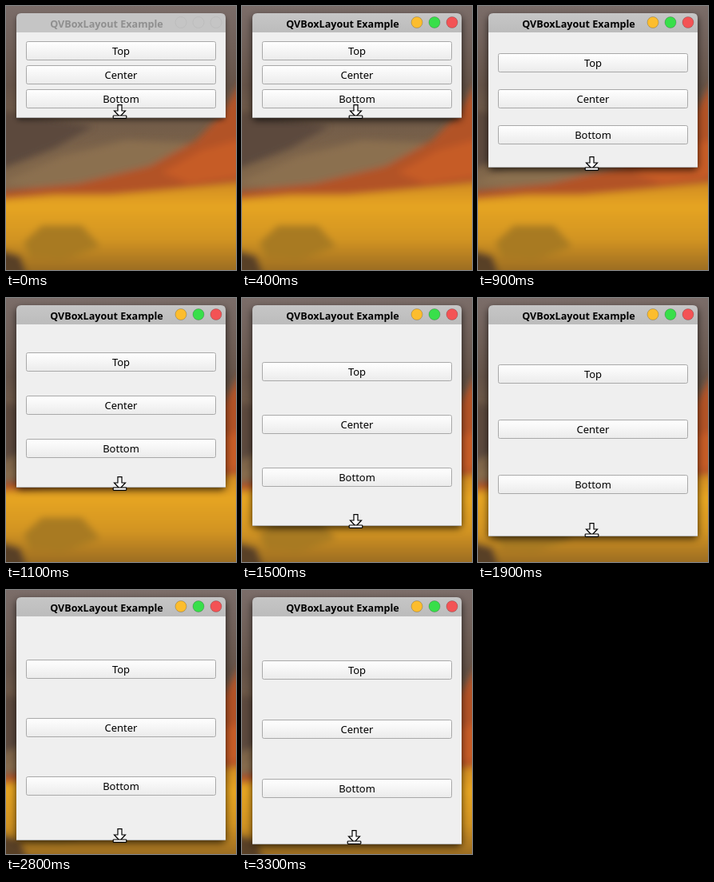
Write an HTML page that moves like this. It is 288 px wide and 330 px high and loops after 5.8 s.

```html
<!DOCTYPE html>
<html lang="en">
<head>
<meta charset="utf-8">
<title>QVBoxLayout Example</title>
<style>
  html, body { margin: 0; width: 100%; height: 100%; overflow: hidden; }
  svg { display: block; width: 288px; height: 330px; }
  text { text-anchor: middle; font: 13px "Noto Sans", sans-serif; }
  #title { font-size: 12.6px; font-weight: bold; }
  #shadow { filter: blur(5px); opacity: .7; }
  #lights circle { stroke: #0003; }
  .button rect { fill: url(#face); stroke: #a9a9a9; }
  .inactive #title { fill: #8f8f8f; }
  .inactive #bar { fill: #c5c5c5; }
  .inactive #shadow { filter: blur(3px); opacity: .45; }
  .inactive #lights circle { fill: #c5c5c5; stroke: #b9b9b9; stroke-width: .7; }
</style>
</head>
<body>
<svg viewBox="0 0 288 330">
  <defs>
    <linearGradient id="face" x2="0" y2="1">
      <stop stop-color="#fff"/><stop offset="1" stop-color="#ebebeb"/>
    </linearGradient>
    <linearGradient id="barFill" x2="0" y2="1">
      <stop stop-color="#c6c6c6"/><stop offset="1" stop-color="#bcbcbc"/>
    </linearGradient>
    <linearGradient id="slope" x2="0" y2="1">
      <stop stop-color="#7b6d69"/><stop offset=".3" stop-color="#655348"/>
      <stop offset=".6" stop-color="#80664a"/>
    </linearGradient>
    <linearGradient id="trees" x2="0" y2="1">
      <stop stop-color="#d08a22"/><stop offset=".25" stop-color="#e6a522"/>
      <stop offset=".6" stop-color="#d29421"/><stop offset="1" stop-color="#8f6425"/>
    </linearGradient>
    <filter id="soft" x="-20%" y="-20%" width="140%" height="140%"><feGaussianBlur stdDeviation="4"/></filter>
  </defs>

  <rect width="288" height="330" fill="url(#slope)"/>
  <g filter="url(#soft)">
    <path d="M-9 150L16 160L30 178L-9 188Z" fill="#7b6d68"/>
    <path d="M-9 205L60 178L110 150L-9 130Z" fill="#5c4a3d"/>
    <path d="M-9 222L70 188L150 168L235 172L200 212L60 230Z" fill="#8b7050"/>
    <path d="M300 85L270 135L238 168L180 200L90 222L-9 232V262H300Z" fill="#b25328"/>
    <path d="M300 165L245 180L195 208L230 222L300 212Z" fill="#c65c28"/>
    <path d="M-9 242L60 236L130 236L200 230L300 220V340H-9Z" fill="url(#trees)"/>
    <path d="M22 295L45 274L95 274L118 300L70 318L30 314Z" fill="#a87a22"/>
    <path d="M-9 304L18 312L28 340H-9Z" fill="#584127"/>
  </g>

  <g id="window">
    <rect id="shadow" x="13" y="13" width="262" rx="5"/>
    <rect id="body" x="13" y="33" width="262" fill="#efefef"/>
    <path id="bar" d="M13 33V15Q13 9 19 9H269Q275 9 275 15V33Z" fill="url(#barFill)"/>
    <text id="title" x="126" y="27">QVBoxLayout Example</text>
    <g id="lights">
      <circle cx="219" cy="20.5" r="7" fill="#fcbd2e"/>
      <circle cx="241" cy="20.5" r="7" fill="#38df4a"/>
      <circle cx="263" cy="20.5" r="7" fill="#f35355"/>
    </g>
    <g id="buttons"></g>
    <path id="edge" d="M13 0H275" stroke="#b4b4b4"/>
  </g>

  <g id="cursor" fill="#fff" stroke="#000" stroke-width="1.2">
    <path d="M-2.5 .6H2.5V8H7L0 15.5L-7 8H-2.5Z"/>
    <rect x="-8.3" y="14" width="16.6" height="3.4" rx=".8"/>
  </g>
</svg>
<script>
const LOOP = 5800, TICK = 100, ACTIVE_AT = 400, RELEASE_AT = 3300;
const TITLE_BOTTOM = 33, MIN_BOTTOM = 140, FIRST_BUTTON = 44, PITCH = 30;

// The drag slows down, then ends with two short tugs: [time, window bottom].
const drag = [
  [500, 140], [700, 167], [1100, 237], [1500, 285], [1700, 294], [1900, 298], [2000, 298],
  [2400, 304], [2700, 304], [2800, 313], [3000, 313], [3100, 318]
];

const $ = id => document.getElementById(id);
const place = (el, x, y) => el.setAttribute("transform", `translate(${x} ${y})`);

$("buttons").innerHTML = ["Top", "Center", "Bottom"].map(label =>
  `<g class="button"><rect x="25.5" y=".5" width="237" height="23" rx="2"/>
   <text x="144" y="17">${label}</text></g>`).join("");
const buttons = [...$("buttons").children];

function bottomAt(time) {
  const next = drag.findIndex(key => key[0] > time);
  if (next < 1) return drag.at(next)[1];
  const [[t0, y0], [t1, y1]] = drag.slice(next - 1, next + 1);
  return Math.round(y0 + (y1 - y0) * (time - t0) / (t1 - t0));
}

function draw(time) {
  const now = Math.floor(time / TICK) * TICK;
  const bottom = bottomAt(now);
  // Four equal stretches share the extra height.
  const stretch = Math.floor((bottom - MIN_BOTTOM) / 4);
  buttons.forEach((button, i) => place(button, 0, FIRST_BUTTON + i * PITCH + (i + 1) * stretch));
  $("window").classList.toggle("inactive", now < ACTIVE_AT);
  $("shadow").setAttribute("height", bottom - 10);
  $("body").setAttribute("height", bottom - TITLE_BOTTOM);
  place($("edge"), 0, bottom - .5);
  // The pointer runs ahead of the edge while dragging.
  const lead = Math.min(3, Math.round((bottom - bottomAt(now - TICK)) / 5));
  const released = now >= RELEASE_AT;
  place($("cursor"), released ? 140.5 : 142.5, bottom - (released ? 18 : 17) + lead);
}

const start = performance.now();
function tick() {
  draw((performance.now() - start) % LOOP);
  requestAnimationFrame(tick);
}
tick();
</script>
</body>
</html>
```
